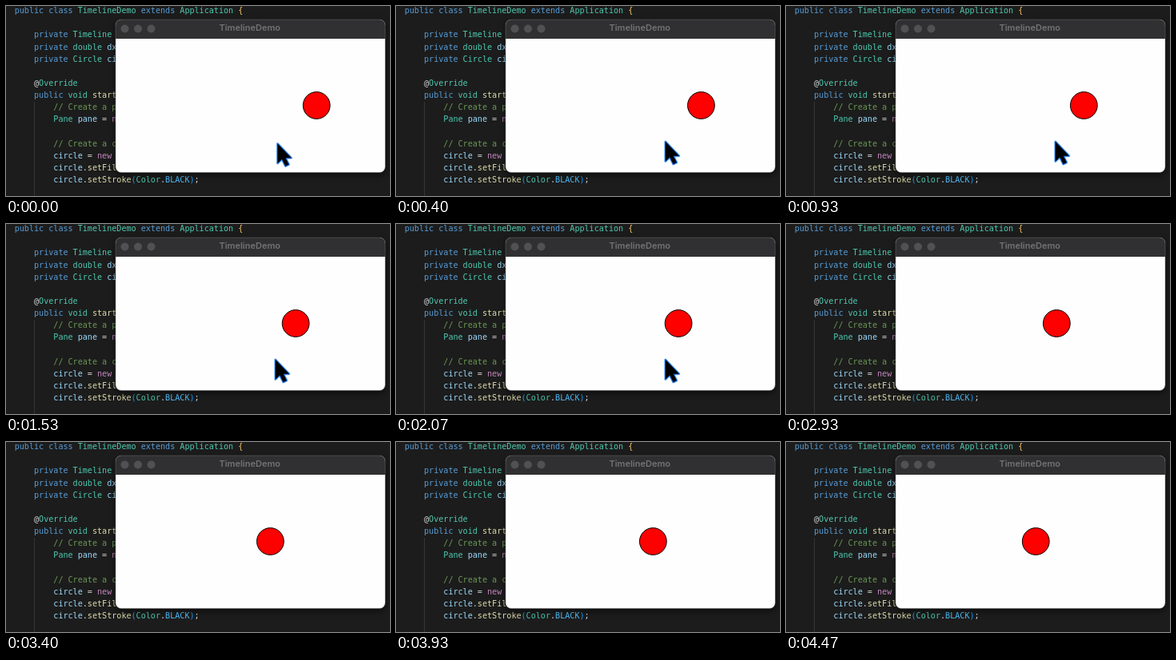
Write an HTML page with a canvas that moves like this. It is 480x238 px and loops after 4.54 s.

```html
<!DOCTYPE html>
<html lang="en">
<head>
<meta charset="utf-8">
<title>TimelineDemo</title>
<style>
  html, body { margin: 0; width: 100%; height: 100%; overflow: hidden; background: #1c1c1c; }
  canvas { display: block; width: 480px; height: 238px; }
</style>
</head>
<body>
<canvas id="stage"></canvas>
<script>
const WIDTH = 480, HEIGHT = 238, LOOP = 4540, STEP = 200 / 3;
const canvas = document.getElementById('stage');
const ctx = canvas.getContext('2d');
const scale = window.devicePixelRatio || 1;
canvas.width = WIDTH * scale;
canvas.height = HEIGHT * scale;

const COLORS = {
  k: '#569cd6', t: '#4ec9b0', v: '#9cdcfe', c: '#6a9955', f: '#dcdcaa',
  n: '#c586c0', w: '#d4d4d4', b: '#4fc1ff', g: '#f5c56b', p: '#179fff'
};

// Each entry: row, indent level, then pairs of colour key and text.
const CODE = [
  [0, 0, 'k', 'public class ', 't', 'TimelineDemo ', 'k', 'extends ', 't', 'Application ', 'g', '{'],
  [2, 1, 'k', 'private ', 't', 'Timeline'],
  [3, 1, 'k', 'private ', 't', 'double ', 'v', 'dx'],
  [4, 1, 'k', 'private ', 't', 'Circle ', 'v', 'circle'],
  [6, 1, 'w', '@', 't', 'Override'],
  [7, 1, 'k', 'public ', 't', 'void ', 'f', 'start'],
  [8, 2, 'c', '// Create a pane'],
  [9, 2, 't', 'Pane ', 'v', 'pane ', 'w', '= ', 'n', 'new'],
  [11, 2, 'c', '// Create a circle'],
  [12, 2, 'v', 'circle ', 'w', '= ', 'n', 'new'],
  [13, 2, 'v', 'circle', 'w', '.', 'f', 'setFill'],
  [14, 2, 'v', 'circle', 'w', '.', 'f', 'setStroke', 'p', '(', 't', 'Color', 'w', '.',
    'b', 'BLACK', 'p', ')', 'w', ';']
];

const clamp01 = x => Math.min(1, Math.max(0, x));
const easeOut = x => 1 - (1 - clamp01(x)) ** 3;

function disc(x, y, r, fill) {
  ctx.beginPath();
  ctx.arc(x, y, r, 0, Math.PI * 2);
  ctx.fillStyle = fill;
  ctx.fill();
}

function drawCode() {
  ctx.fillStyle = '#1c1c1c';
  ctx.fillRect(0, 0, WIDTH, HEIGHT);
  ctx.fillStyle = '#353535';
  ctx.fillRect(35, 120, 1, HEIGHT - 120);

  ctx.font = '10.1px "DejaVu Sans Mono", monospace';
  ctx.textAlign = 'left';
  ctx.textBaseline = 'alphabetic';
  for (const [row, level, ...tokens] of CODE) {
    let x = 10.7 + level * 24.3;
    for (let i = 0; i < tokens.length; i += 2) {
      ctx.fillStyle = COLORS[tokens[i]];
      ctx.fillText(tokens[i + 1], x, 9.2 + row * 15.13);
      x += ctx.measureText(tokens[i + 1]).width;
    }
  }
}

function drawWindow() {
  const frame = new Path2D();
  frame.roundRect(137, 17, 337, 191.5, 7);

  ctx.save();
  ctx.shadowColor = 'rgba(0, 0, 0, 0.6)';
  ctx.shadowBlur = 9 * scale;
  ctx.shadowOffsetY = 3 * scale;
  ctx.fillStyle = '#fefefe';
  ctx.fill(frame);
  ctx.restore();

  ctx.save();
  ctx.clip(frame);
  ctx.fillStyle = '#303032';
  ctx.fillRect(137, 17, 337, 24);
  ctx.restore();
  ctx.strokeStyle = 'rgba(110, 110, 110, 0.6)';
  ctx.lineWidth = 0.8;
  ctx.stroke(frame);

  for (const x of [148.5, 165, 181.5]) disc(x, 28.5, 5, '#515153');
  ctx.font = '600 11px Inter, sans-serif';
  ctx.textAlign = 'center';
  ctx.fillStyle = '#737375';
  ctx.fillText('TimelineDemo', 304.7, 31.2);
}

function drawBall(t) {
  disc(388.2 - t * 0.017, 124.5, 16.9, '#ff0000');
  ctx.strokeStyle = '#000';
  ctx.lineWidth = 1;
  ctx.stroke();
}

function drawPointer(t) {
  const settle = easeOut(t / 400);
  const leave = clamp01((t - 2660) / 260);
  if (leave === 1) return;

  ctx.save();
  ctx.translate(339.5 - 2.7 * settle, 172.5 - 2.5 * settle + 72 * leave * leave);
  const arrow = new Path2D('M0 0 V24.5 L5.5 19.2 L9.8 28 L14 26 L9.8 17.8 H17 Z');
  ctx.lineJoin = 'round';
  ctx.strokeStyle = 'rgba(120, 175, 245, 0.55)';
  ctx.lineWidth = 3.4;
  ctx.stroke(arrow);
  ctx.strokeStyle = '#176fe0';
  ctx.lineWidth = 2;
  ctx.stroke(arrow);
  ctx.fillStyle = '#000';
  ctx.fill(arrow);
  ctx.restore();
}

function render(now) {
  const t = now % LOOP;
  const tick = Math.floor((10 * Math.floor(t / 10) + 5) / STEP);
  const time = Math.min(tick, 67) * STEP;
  ctx.setTransform(scale, 0, 0, scale, 0, 0);
  drawCode();
  drawWindow();
  drawBall(time);
  drawPointer(time);
}

const start = performance.now();
function loop() {
  render(performance.now() - start);
  requestAnimationFrame(loop);
}
loop();
</script>
</body>
</html>
```
